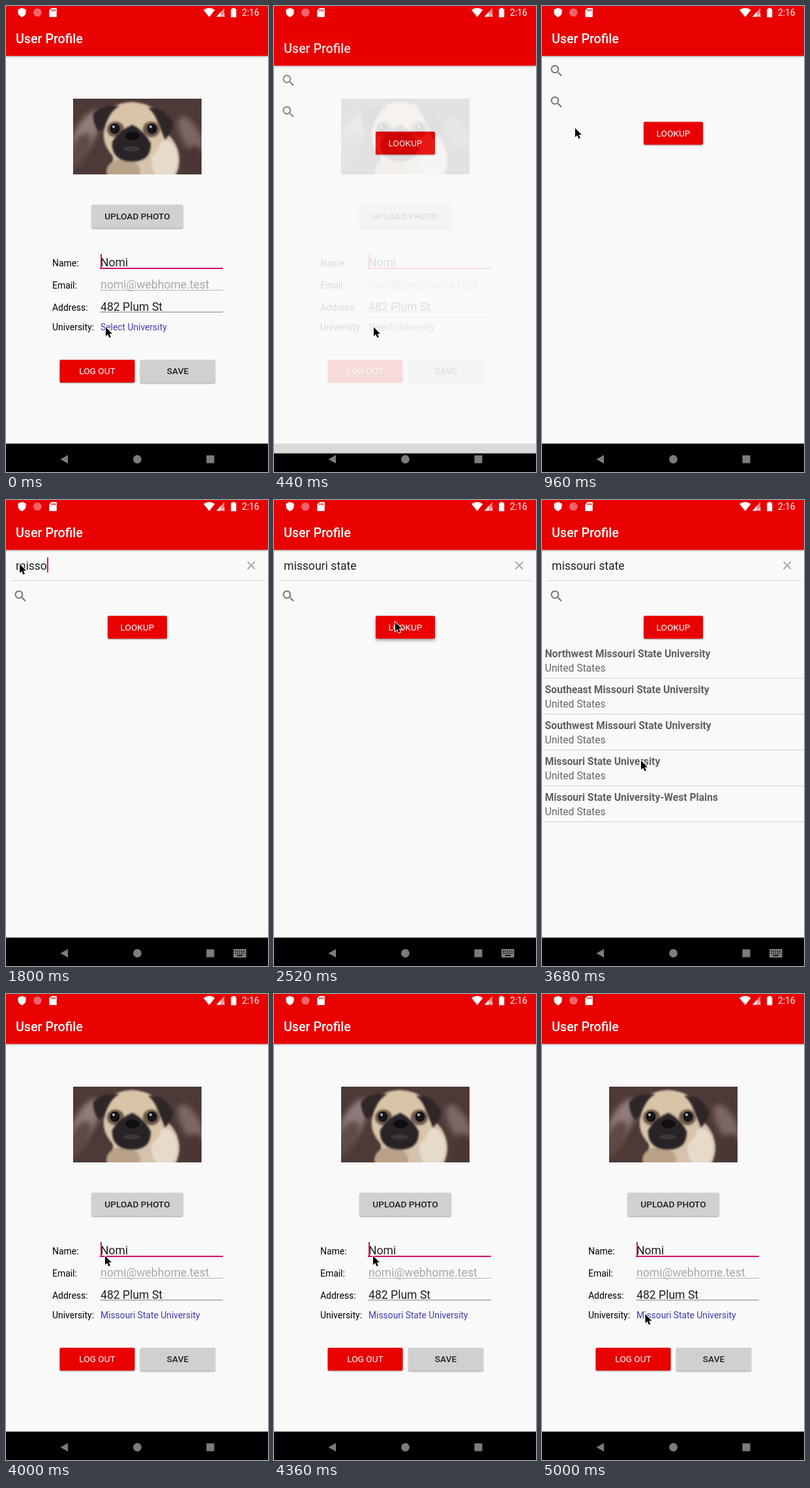
Write an HTML page with a canvas that moves like this. It is 402 px wide and 714 px high and loops after 5040 ms.

```html
<!DOCTYPE html>
<html lang="en">
<head>
<meta charset="utf-8">
<title>User Profile</title>
<style>
html, body { margin: 0; width: 402px; height: 714px; overflow: hidden; }
canvas { display: block; }
</style>
</head>
<body>
<canvas id="stage" width="402" height="714"></canvas>
<script>
const W = 402, H = 714, LOOP = 5040, STEP = 40;
const RED = '#e90000', PINK = '#d0106a', PAGE = '#f9f9f9', GRAY = '#cfd1d0', NAV = '#7c7c7c';
const OPEN = 358, FOCUS = 1160, CLOSE = 3720;
const BAR = 76.5;
const QUERY = 'missouri state';
const SCHOOLS = ['Northwest Missouri State University', 'Southeast Missouri State University',
  'Southwest Missouri State University', 'Missouri State University',
  'Missouri State University-West Plains'];
// pointer stops: time, x, y
const STOPS = [[600, 153, 492], [1120, 21, 98], [1840, 21, 98], [2120, 186, 187],
  [3080, 186, 187], [3600, 152, 399], [3960, 152, 401], [4400, 152, 401], [4960, 158.5, 490.5]];

const screen = document.getElementById('stage').getContext('2d');
const layer = document.createElement('canvas');
layer.width = W;
layer.height = H;
const layerCtx = layer.getContext('2d');
let g = screen;

const clamp = v => Math.min(1, Math.max(0, v));
const within = (t, a, b) => t >= a && t < b;

function rect(x, y, w, h, color) {
  g.fillStyle = color;
  g.fillRect(x, y, w, h);
}
function text(str, x, y, size, color, weight = 400, align = 'left') {
  g.font = `${weight} ${size}px Roboto, sans-serif`;
  g.textAlign = align;
  g.fillStyle = color;
  g.fillText(str, x, y);
}
function oval(x, y, rx, ry, color, turn = 0) {
  g.fillStyle = color;
  g.beginPath();
  g.ellipse(x, y, rx, ry, turn, 0, 7);
  g.fill();
}
function shape(d, color, x = 0, y = 0, scale = 1) {
  g.save();
  g.translate(x, y);
  g.scale(scale, scale);
  g.fillStyle = color;
  g.fill(new Path2D(d));
  g.restore();
}
function shadow(lift, alpha) {
  g.shadowColor = `rgba(0,0,0,${alpha})`;
  g.shadowBlur = lift * 2;
  g.shadowOffsetY = lift;
}
function button(label, x, y, w, h, fill, lift = 1) {
  g.save();
  shadow(lift, 0.38);
  g.fillStyle = fill;
  g.beginPath();
  g.roundRect(x, y, w, h, 2);
  g.fill();
  g.restore();
  const [ink, weight] = fill === RED ? ['#fff', 400] : ['#202020', 500];
  text(label, x + w / 2, Math.floor(y + h / 2 + 5), 13.7, ink, weight, 'center');
}

function frame() {
  rect(0, 0, W, H, PAGE);
  g.save();
  shadow(1.5, 0.35);
  rect(0, 0, W, BAR, RED);
  g.restore();
  text('User Profile', 15, 56.7, 19.7, '#fff', 500);
  rect(0, 670.5, W, 44, '#000');
}

function photo() {
  g.save();
  g.beginPath();
  g.rect(103, 142, 197, 116);
  g.clip();
  rect(103, 142, 197, 116, '#4d3937');
  g.filter = 'blur(4px)';
  oval(122, 195, 16, 38, '#8f7b7a', 0.5);
  oval(112, 222, 14, 30, '#5e4a48', 0.5);
  oval(284, 200, 14, 34, '#7d6765', -0.5);
  oval(290, 236, 16, 22, '#4a3534');
  g.filter = 'blur(1.5px)';
  oval(215, 236, 51, 52, '#d6c3ad');
  oval(243, 236, 20, 30, '#e6dacb');
  oval(180, 254, 26, 20, '#b9a288');
  shape('M152 185Q148 150 193 147Q238 150 239 185Q244 212 224 230Q194 246 164 230Q144 208 152 185Z', '#d9c4a8');
  shape('M134 165Q148 151 174 153Q162 160 156 174Q148 192 142 192Q132 178 134 165Z', '#2f2628');
  shape('M218 156Q244 154 256 180Q256 192 244 205Q238 190 232 176Q228 164 218 156Z', '#2f2628');
  oval(168, 189, 13, 12, '#6b5649');
  oval(223, 189, 13, 12, '#6b5649');
  shape('M194 182Q212 191 222 210Q223 230 208 236Q194 241 178 236Q161 228 163 208Q174 190 194 182Z', '#282326');
  g.filter = 'blur(0.6px)';
  for (const x of [167, 224]) {
    oval(x, 188, 7.5, 8, '#17151a');
    oval(x - 2, 185, 2, 2, '#b9bfca');
  }
  oval(194, 199, 11, 6.5, '#100e11');
  oval(193, 219, 13, 4, '#3d363a');
  g.restore();
}

function profile(school, caret) {
  frame();
  photo();
  button('UPLOAD PHOTO', 131.5, 304.5, 140, 36, GRAY);
  ['Name:', 'Email:', 'Address:'].forEach((s, i) => text(s, 71, 399 + 34 * i, 13.95, '#000'));
  text('University:', 71, 497, 13.95, '#000');
  text('Nomi', 145, 399, 17.6, '#202020');
  text('nomi@webhome.test', 145, 433, 17.6, '#a8a8a8');
  text('482 Plum St', 145, 467, 17.6, '#202020');
  rect(144, 401, 189, 2, PINK);
  rect(144, 435, 189, 1, '#b4b4b4');
  rect(144, 468.5, 189, 1, '#7c7c7c');
  if (caret) rect(145, 380, 2, 23, PINK);
  text(school, 145, 497, 13.85, '#423cb0');
  button('LOG OUT', 82.5, 542, 115, 35, RED);
  button('SAVE', 206, 542, 115, 36 - 0.5, GRAY);
}

function magnifier(y) {
  shape('M15.5 14h-.79l-.28-.27A6.47 6.47 0 0 0 16 9.5 6.5 6.5 0 1 0 9.5 16c1.61 0 3.09-.59 4.23-1.57l.27.28v.79l5 4.99L20.49 19zM9.5 14a4.5 4.5 0 1 1 0-9 4.5 4.5 0 0 1 0 9z',
    '#737373', 10.5, y - 11.5, 0.978);
}

function typedCount(t) {
  if (t < 1440) return 0;
  return t < 1840 ? 1 + Math.floor((t - 1440) / 80) : 6 + Math.floor((t - 1840) / 50);
}

function search(t) {
  frame();
  if (t < FOCUS) magnifier(99);
  else {
    const typed = QUERY.slice(0, typedCount(t));
    text(typed, 15, 106.5, 17.6, '#202020');
    const end = 15 + g.measureText(typed).width;
    if (!within(t, 2320, 2680) && !within(t, 3200, CLOSE)) rect(end, 88, 2, 23, PINK);
    rect(8, 123, 388, 1, '#d2d2d2');
    g.strokeStyle = '#a9a9a9';
    g.lineWidth = 1.9;
    g.stroke(new Path2D('M370.5 94.5l11.5 11.5m0-11.5l-11.5 11.5'));
  }
  magnifier(147);
  button('LOOKUP', 156, 177.5, 91, 35, RED, within(t, 2520, 3000) ? 2.5 : 1);
  if (t >= 2720) SCHOOLS.forEach((name, i) => {
    const y = 55 * i;
    text(name, 4.5, 241.3 + y, 15.65, '#606060', 700);
    text('United States', 4.5, 262.7 + y, 15.65, '#686868');
    rect(0, 272.5 + y, W, 1, '#d2d2d2');
  });
}

// draws a page as one faded, shifted sheet; its app bar has a second coat
function sheet(draw, alpha, dy) {
  g = layerCtx;
  draw();
  g = screen;
  g.globalAlpha = alpha;
  rect(0, 0, W, BAR + dy, RED);
  g.drawImage(layer, 0, dy);
  g.globalAlpha = 1;
}

function systemBars(t) {
  shape('M24.5 3l6 2.3v4.2q0 5-6 7.7q-6-2.7-6-7.7v-4.2z', '#fff');
  oval(48.3, 10, 6.3, 6.3, '#f4626a');
  shape('M70 3h6.5q1.2 0 1.2 1.2v11.6q0 1.2-1.2 1.2h-9q-1.2 0-1.2-1.2v-9z', '#fff');
  for (const x of [69.5, 72, 74.5]) rect(x, 5, 1.3, 3, RED);
  shape('M303 6q9-6 17.5 0l-8.7 11z', '#fff');
  shape('M335 3v13.5h-12z', '#f58a8a');
  shape('M329.5 9.2v7.3h-6.5z', '#fff');
  g.strokeStyle = '#fff';
  g.lineWidth = 1;
  g.stroke(new Path2D('M332 12.5l3.5 4m0-4l-3.5 4'));
  shape('M347.5 3h3.5v1.5h2.3v12.7h-8.1v-12.7h2.3z', '#fff');
  text('2:16', 388.5, 15, 13.8, '#fff', 400, 'right');

  shape('M83.5 694.5l11.5-6.5v13z', NAV);
  oval(201.5, 694.5, 6.4, 6.4, NAV);
  rect(307.5, 688.5, 12, 12, NAV);
  if (within(t, FOCUS, CLOSE)) {
    rect(349, 688, 19.5, 13, NAV);
    for (let i = 0; i < 10; i++) rect(351.3 + (i % 5) * 3.2, 690.5 + (i > 4) * 3.2, 1.6, 1.6, '#000');
    rect(354.5, 697, 8.5, 1.6, '#000');
  }
}

function pointer(t) {
  let [, x, y] = STOPS[0];
  for (let i = 1; i < STOPS.length; i++) {
    const [t0, x0, y0] = STOPS[i - 1], [t1, x1, y1] = STOPS[i];
    if (t < t0) break;
    const p = clamp((t - t0) / (t1 - t0)), e = p * p * (3 - 2 * p);
    x = x0 + (x1 - x0) * e;
    y = y0 + (y1 - y0) * e;
  }
  g.save();
  g.translate(x, y);
  const arrow = new Path2D('M0 0v14l3.2-3 2.3 5.3 2.4-1-2.3-5.1h4.4z');
  g.strokeStyle = '#fff';
  g.lineWidth = 1.8;
  g.stroke(arrow);
  g.fillStyle = '#000';
  g.fill(arrow);
  g.restore();
}

function render(t) {
  if (t < OPEN + 350) profile('Select University', true);
  if (t >= CLOSE) profile('Missouri State University', !within(t, 4500, 5000));
  if (within(t, OPEN, CLOSE)) {
    const fade = 1 - clamp((t - OPEN) / 200), slide = 1 - clamp((t - OPEN) / 350);
    sheet(() => search(t), 1 - fade ** 4, Math.round(57 * slide ** 5));
  } else if (within(t, CLOSE, CLOSE + 250)) {
    const age = t - CLOSE;
    sheet(() => search(t), 1 - clamp((age - 100) / 150), Math.round(57 * (age / 250) ** 4));
  }
  systemBars(t);
  pointer(t);
}

const start = performance.now();
function tick() {
  const t = (performance.now() - start) % LOOP;
  render(Math.floor(t / STEP) * STEP);
  requestAnimationFrame(tick);
}
tick();
</script>
</body>
</html>
```
